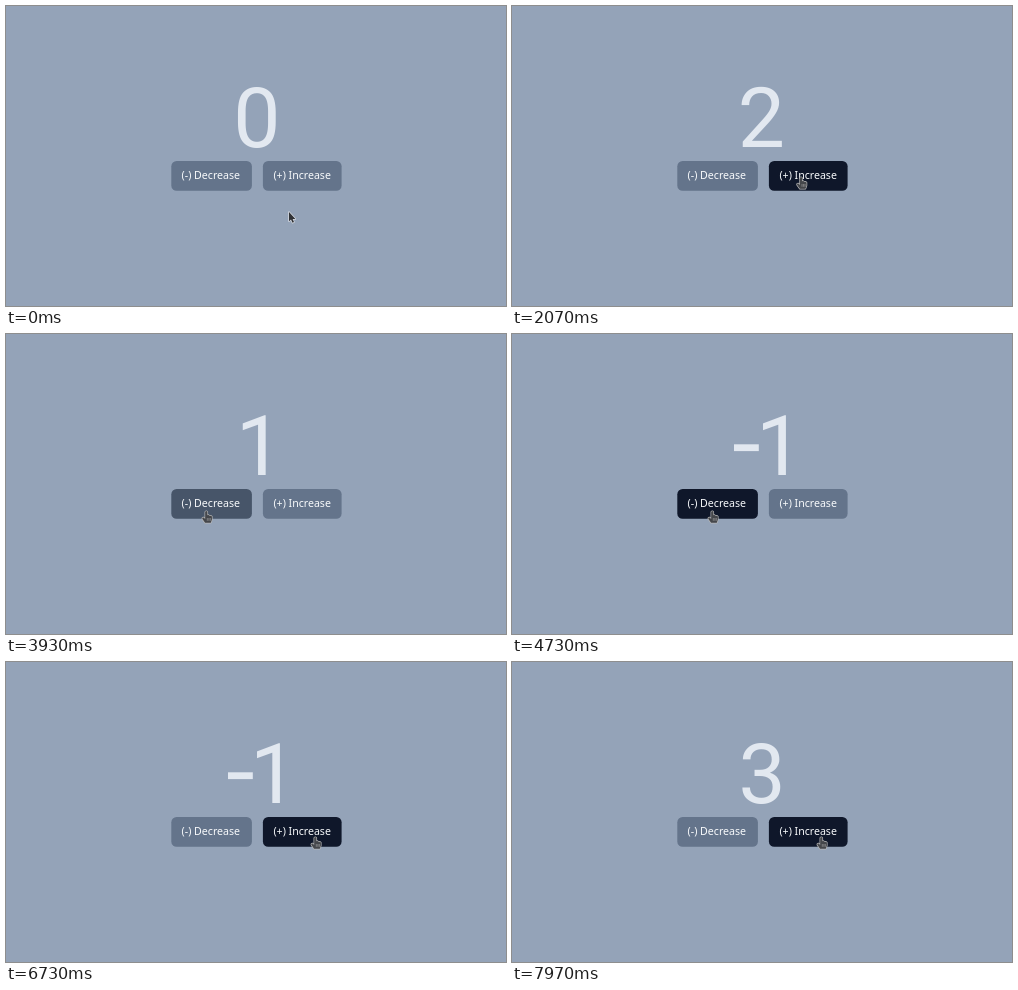
Recreate the animation shown at these times as an HTML page with a canvas. Size 500x300 px, loop 8 s.

```html
<!DOCTYPE html>
<html lang="en">
<head>
<meta charset="utf-8">
<title>Counter</title>
<style>
  html, body { margin: 0; width: 100%; height: 100%; overflow: hidden; background: #94a3b8; }
  canvas { display: block; width: 500px; height: 300px; }
</style>
</head>
<body>
<canvas id="stage" width="500" height="300"></canvas>
<script>
const ctx = document.getElementById('stage').getContext('2d');
const LOOP = 8000;
const COUNT_FONT = '84px Roboto, "Noto Sans", sans-serif';
const LABEL_FONT = '500 10.6px "Noto Sans", "Open Sans", sans-serif';
const COLORS = { idle: '#64748b', hover: '#475569', active: '#0f172a' };

const decrease = { x: 165.3, w: 80.6, label: '(-) Decrease', textX: 175.6, step: -1 };
const increase = { x: 256.9, w: 78.7, label: '(+) Increase', textX: 267.4, step: 1 };
const TOP = 155, HEIGHT = 29.8;

// [press, release, button]; the count changes on release
const clicks = [
  [1430, 1500, increase], [1730, 1830, increase], [2070, 2170, increase],
  [3430, 3530, decrease], [3830, 3930, decrease], [4130, 4270, decrease],
  [4500, 4600, decrease], [4730, 4870, decrease],
  [6100, 6200, increase], [6730, 6830, increase], [7070, 7230, increase],
  [7370, 7500, increase], [7700, 7800, increase], [7970, 8100, increase]
];

// Pointer moves as quadratic curves: start, control and end point
const moves = [
  { t0: 740, t1: 1170, pts: [[283, 206], [285, 190], [289, 171]] },
  { t0: 2670, t1: 3200, pts: [[289, 171], [272, 244], [200.3, 177]] },
  { t0: 5270, t1: 5730, pts: [[200.3, 177], [255, 178], [309.3, 175]] }
];

// Centre of each digit's ink
const centers = [250.8, 248.3, 249.7, 249];

const smooth = k => k * k * (3 - 2 * k);

function pointerAt(t) {
  let pos = moves[0].pts[0];
  for (const { t0, t1, pts: [a, b, c] } of moves) {
    if (t < t0) break;
    const k = smooth(Math.min(1, (t - t0) / (t1 - t0)));
    pos = [0, 1].map(i => (1 - k) ** 2 * a[i] + 2 * k * (1 - k) * b[i] + k * k * c[i]);
  }
  return pos;
}

function contains(button, [x, y]) {
  return x >= button.x && x <= button.x + button.w && y >= TOP && y <= TOP + HEIGHT;
}

function drawCount(n) {
  const digit = String(Math.abs(n));
  ctx.fillStyle = '#e2e8f0';
  ctx.font = COUNT_FONT;
  const m = ctx.measureText(digit);
  const inkMiddle = (m.actualBoundingBoxRight - m.actualBoundingBoxLeft) / 2;
  const shift = n < 0 ? 14.2 : 0;
  ctx.fillText(digit, centers[digit] + shift - inkMiddle, 141.2);
  if (n < 0) ctx.fillRect(n === -1 ? 222 : 219.5, 110.3, 24.8, 6.8);
}

function drawButton(button, state) {
  ctx.fillStyle = COLORS[state];
  ctx.beginPath();
  ctx.roundRect(button.x, TOP, button.w, HEIGHT, 5.3);
  ctx.fill();
  ctx.fillStyle = '#f8fafc';
  ctx.font = LABEL_FONT;
  ctx.fillText(button.label, button.textX, 173.3);
}

const arrow = new Path2D('M0 0V9.3L2 7.5L3.5 10.8L5 10.1L3.6 7H6.4Z');
const hand = new Path2D(
  'M-1.1 .8Q0 -.7 1.1 .8V4.2L2.2 4L3.4 4.7L4.6 4.7L5.6 5.6' +
  'V8.5L4.5 11.8H-1.2L-4 7.8Q-4.3 6.2 -2.7 6.5L-1.1 8Z');
const knuckles = new Path2D('M1 7V9.8M2.6 7V9.8M4 7V9.8');

function drawPointer([x, y], isHand) {
  ctx.save();
  ctx.translate(x, y);
  ctx.lineJoin = 'round';
  ctx.lineWidth = isHand ? 1.3 : 1.5;
  ctx.strokeStyle = isHand ? '#b8b8b8' : '#d5d9df';
  ctx.fillStyle = isHand ? '#45474b' : '#303236';
  const shape = isHand ? hand : arrow;
  ctx.stroke(shape);
  ctx.fill(shape);
  if (isHand) {
    ctx.lineWidth = 0.5;
    ctx.stroke(knuckles);
  }
  ctx.restore();
}

function draw(t) {
  const pos = pointerAt(t);
  let count = 0, pressed = null;
  for (const [down, up, button] of clicks) {
    if (t >= up) count += button.step;
    else if (t >= down) pressed = button;
  }
  ctx.fillStyle = '#94a3b8';
  ctx.fillRect(0, 0, 500, 300);
  drawCount(count);
  let over = false;
  for (const button of [decrease, increase]) {
    const hovered = contains(button, pos);
    over = over || hovered;
    drawButton(button, button === pressed ? 'active' : hovered ? 'hover' : 'idle');
  }
  drawPointer(pos, over);
}

const start = performance.now();
function tick() {
  draw((performance.now() - start) % LOOP);
  requestAnimationFrame(tick);
}
tick();
</script>
</body>
</html>
```
